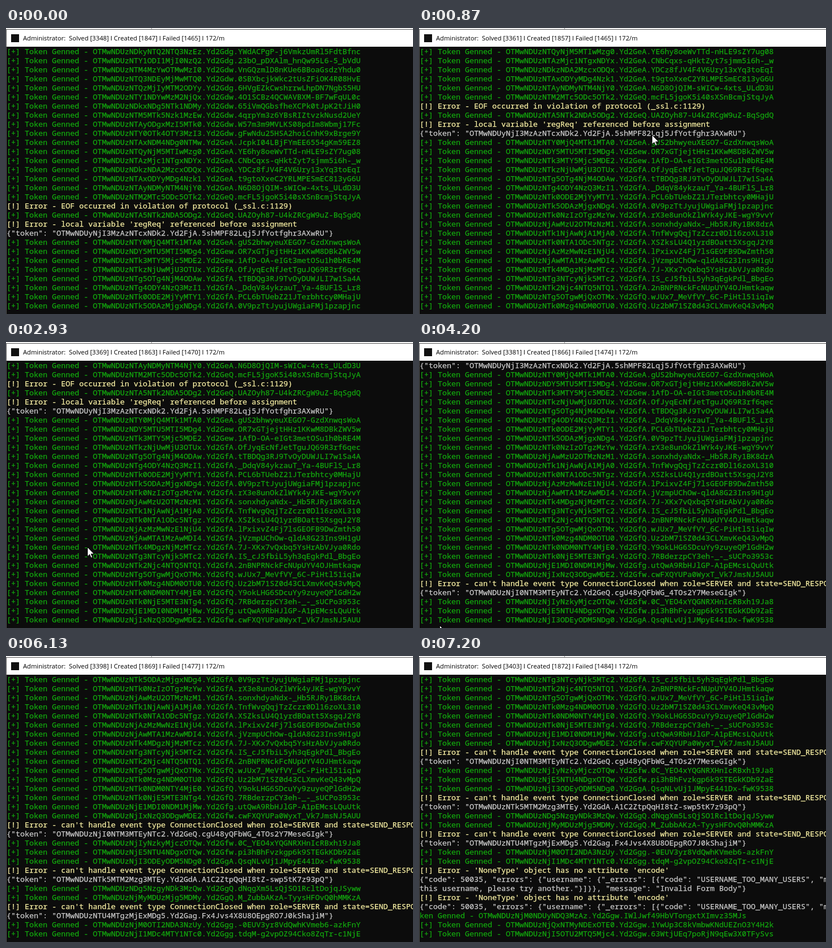
Write an HTML page that moves like this. It is 717 by 504 pixels and loops after 7340 ms.

```html
<!DOCTYPE html>
<html lang="en">
<head>
<meta charset="utf-8">
<title>Console log</title>
<style>
  html, body { margin: 0; width: 100%; height: 100%; overflow: hidden; background: #0c0c0c; }
  #stage { position: relative; width: 717px; height: 504px; overflow: hidden; background: #0c0c0c; }
  #stage > * { position: absolute; }
  #bar { left: 0; top: 0; width: 717px; height: 33px; background: #fff; }
  #edge { left: 0; top: 2px; width: 717px; height: 1px; background: #555; }
  #tick { left: 256px; top: 0; width: 1px; height: 2px; background: #999; }
  #side { left: 0; top: 2px; width: 1px; height: 502px; background: #555; }
  #icon { left: 9px; top: 11px; width: 14px; height: 14px; background: #111; }
  #title {
    left: 30px; top: 10px; white-space: pre; color: #000;
    font: 11.2px/16px "Open Sans", "Noto Sans", sans-serif;
  }
  #view { left: 1px; top: 33px; width: 716px; height: 464px; overflow: hidden; }
  #log {
    white-space: pre; font-variant-ligatures: none; -webkit-text-stroke: .25px;
    font: 13.333px/16px "Noto Sans Mono", "DejaVu Sans Mono", monospace;
  }
  #log div { height: 16px; }
  .ok { color: #13a80e; }
  .err { color: #f9f1a5; }
  .raw { color: #ccc; }
  #mouse { left: 0; top: 0; overflow: visible; }
</style>
</head>
<body>
<div id="stage">
  <div id="bar"></div>
  <div id="edge"></div>
  <div id="tick"></div>
  <div id="side"></div>
  <div id="icon"></div>
  <div id="title"></div>
  <div id="view"><div id="log"></div></div>
  <svg id="mouse" width="14" height="22">
    <path d="M.5 .5V17L4.3 13.4 6.9 19.4 9.4 18.3 6.9 12.5H12.2Z" fill="#fff" stroke="#000"/>
  </svg>
</div>
<script>
// Line kinds: "!" error, '"' token reply, "=" plain reply, "+" plain success, otherwise a token.
const source = String.raw`
NDkyNTQ2NTQ3NzEz.Yd2Gdg.YWdACPgP-j6VmkzUmRl5FdtBfnc
NTY1ODI1MjI0NzQ2.Yd2Gdg.23bO_pDXAlm_hnQw95L6-5_bVdU
NTM4MzYwOTMwMzI0.Yd2Gdw.VnGQzmlD8nKUe6BBoaGsdzYhdu0
NTQ3NDEyMjMwMTQ0.Yd2Gdw.0SBXbcjkWkc2tUsZFiOK4R08HvE
NTQzMjIyMTM2ODYy.Yd2Gdg.6HVgEZkCwshrrwLhpDN7NgbS5HU
NTY1NDYwMzM2NjQx.Yd2Gdw.4O1SCBz4QCWAVBXM-BF7wFqUL0c
NDkxNDg5NTk1NDMy.Yd2Gdw.65iVmQGbsfheXCPk0tJpK2tJiH0
NTM5MTk5Nzk1MzEw.Yd2Gdw.4qrpYm3z6YBsRIZtvzkNusd2UeY
NTAyODgxMzI5MTk0.Yd2Gdw.W57m3m9MVLKS08pdIm8Wbmj17Fc
NTY0OTk4OTY3MzI3.Yd2Gdw.gFwNdu25HSA2hoiCnhK9xBrge9Y
NTAxNDM4NDg0NTMw.Yd2GeA.JcpkI04LBjFYmEE6554gKm59EZ8
NTQyNjM5MTIwMzg0.Yd2GeA.YE6hy8oeWvTTd-nHLE9sZY7ug08
NTAzMjc1NTgxNDYx.Yd2GeA.CNbCqxs-qHktZyt7sjmm5i6h-_w
NDkzNDA2MzcxODQx.Yd2GeA.YDCz8fJV4F4V6Ury13xYq3toEqI
NTAxODYyMDg4Nzk1.Yd2GeA.t9gtoXxeC2YRLMPESmEC813yG6U
NTAyNDMyNTM4NjY0.Yd2GeA.N6D8OjQIM-sWICw-4xts_ULdD3U
NTM2MTc5ODc5OTk2.Yd2GeQ.mcFL5jgoK5i40sXSnBcmjStqJyA
!EOF occurred in violation of protocol (_ssl.c:1129)
NTA5NTk2NDA5ODg2.Yd2GeQ.UAZOyh87-U4kZRCgW9uZ-BqSgdQ
!local variable 'regReq' referenced before assignment
"yNjI3MzAzNTcxNDk2.Yd2FjA.5shMPF82Lqj5JfYotfghr3AXwRU
NTY0MjQ4MTk1MTA0.Yd2GeA.gUS2bhwyeuXEGO7-GzdXnwqsWoA
NDY5MTU5MTI5MDg4.Yd2Gew.OR7xGTjejtHHz1KKwM8DBkZWV5w
NTk3MTY5Mjc5MDE2.Yd2Gew.1AfD-OA-eIGt3metOSu1h0bRE4M
NTkzNjUwMjU3OTUx.Yd2GfA.OfJyqEcNfJetTguJQ69R3rf6qec
NTg5OTg4NjM4ODAw.Yd2GfA.tTBDQg3RJ9TvOyDUWJLI7w1Sa4A
NTg4ODY4NzQ3MzI1.Yd2GfA._DdqV84ykzauT_Ya-4BUFlS_Lr8
NTk0ODE2MjYyMTY1.Yd2GfA.PCL6bTUebZ21JTerbhtcy0MHajU
NTk5ODAzMjgxNDg4.Yd2GfA.0V9pzTtJyujUWgiaFMj1pzapjnc
NTk0NzIzOTgzMzYw.Yd2GfA.rX3e8unOkZlWYk4yJKE-wgY9vvY
NjAwMzU2OTMzNzM1.Yd2GfA.sonxhdyaNdx-_Hb5RJRy1BK8drA
NTk1NjAwNjA1MjA0.Yd2GfA.TnfWvgQqjTzZczr0Dl16zoXL310
NTk0NTA1ODc5NTgz.Yd2GfA.XSZksLU4Q1yrdBOatt5XsgqJ2Y8
NjAzMzMwNzE1NjU4.Yd2GfA.lPxixvZ4Fj7lsGEOFB9DwZmth50
NjAwMTA1MzAwMDI4.Yd2GfA.jVzmpUChOw-qldA8G23Ins9H1gU
NTk4MDgzNjMzMTcz.Yd2GfA.7J-XKx7vQxbq5YsHrAbVJya0Rdo
NTg3NTcyNjk5MTc2.Yd2GfA.IS_cJ5fbiL5yh3qEgkPdl_BbgEo
NTk2Njc4NTQ5NTQ1.Yd2GfA.2nBNPRNckFcNUpUYV4OJHmtkaqw
NTg5OTgwMjQxOTMx.Yd2GfQ.wJUx7_MeVfVY_6C-PiHtl51iqIw
NTk0Mzg4NDM0OTU0.Yd2GfQ.Uz2bM71SZ0d43CLXmvKeQ43vMpQ
NTk0NDM0NTY4MjE0.Yd2GfQ.Y9okLHG6SDcuYy9zuyeQPlGdH2w
NTk0NjE5MTE3NTg4.Yd2GfQ.7RBderzpCY3eh-_-_sUCPo3953c
NjE1MDI0NDM1MjMw.Yd2Gfg.utQwA9RbHJlGP-A1pEMcsLQuUtk
NjIxNzQ3ODgwMDE2.Yd2Gfw.cwFXQYUPa0WyxT_Vk7JmsNJ5AUU
!closed
"zNjI0NTM3MTEyNTc2.Yd2GeQ.cgU48yQFbWG_4TOs2Y7MeseGIgk
NjIyNzkyMjczOTQw.Yd2Gfw.0C_YEO4xYQGNRXHnIcRBxh19Ja8
NjE5NTU4NDgxOTQw.Yd2Gfw.pi3hBhFvzkgp6k9STEGkKDb9ZaE
NjI3ODEyODM5NDg0.Yd2GgA.QsqNLvUj1JMpyE441Dx-fwK9538
!closed
"zNTk5MTM2Mzg3MTEy.Yd2GdA.A1C2ZtpQqHI8tZ-swp5tK7z93pQ
NDg5NzgyNDk3MzQw.Yd2GgQ.dNqgXm5LsQjSO1RcltDojqJSyww
NjMyMDUzMjg5MDMy.Yd2GgQ.M_ZubbAKzA-TyysHFOvQ0hMMKzA
!closed
"zNTU4MTgzMjExMDg5.Yd2Gag.Fx4Jvs4X8U8OEpgRO7J0kShajiM
NjM0OTI2NDA3NzUy.Yd2Ggg.-0EUV3yr8VdQwhKVmeb6-azkFnY
NjI1MDc4MTY1NTc0.Yd2Ggg.tdqM-g2vpOZ94Cko8ZqTr-c1NjE
!'NoneType' object has no attribute 'encode'
=form
=this username, please try another."}]}}, "message": "Invalid Form Body"}
!'NoneType' object has no attribute 'encode'
=form
+ken Genned - OTMwNDUzNjM0NDUyNDQ3MzAz.Yd2Ggw.IWlJwf49HbVTongxtXImvz35MJs
NjQxNTMyNDExOTE0.Yd2Ggw.1YwUp3C8kVmbwKNdUEZnO3Y4H2k
NjI5OTU2MTQ5Mjc4.Yd2Ggw.63WtjUEq7poRjN9qEw3X0TFySvs`;

const longText = {
  closed: "can't handle event type ConnectionClosed when role=SERVER and state=SEND_RESPONSE",
  form: '{"code": 50035, "errors": {"username": {"_errors": [{"code": "USERNAME_TOO_MANY_USERS", "message'
};

function parse(line) {
  const rest = line.slice(1), body = longText[rest] || rest;
  switch (line[0]) {
    case "!": return ["err", "[!] Error - " + body];
    case '"': return ["raw", `{"token": "OTMwNDU${rest}"}`];
    case "=": return ["raw", body];
    case "+": return ["ok", body];
    default: return ["ok", "[+] Token Genned - OTMwNDUz" + line];
  }
}

const $ = id => document.getElementById(id);
const log = $("log"), title = $("title"), mouse = $("mouse");
for (const line of source.trim().split("\n")) {
  const row = document.createElement("div");
  [row.className, row.textContent] = parse(line);
  log.append(row);
}

const LOOP = 7340, STEP = 1000 / 15, ROW = 16;

// Step, rows scrolled, solved, created, failed
const progress = [
  [0, 0, 3348, 1847, 1465],
  [13, 11, 3361, 1857, 1465],
  [44, 15, 3369, 1863, 1470],
  [60, 20, 3381, 1866, 1474],
  [63, 20, 3381, 1866, 1474],
  [82, 24, 3392, 1867, 1476],
  [92, 28, 3398, 1869, 1477],
  [108, 36, 3403, 1872, 1484]
];

// Step, x, y of the pointer tip
const path = [
  [0, 690, 560], [5, 676, 508], [13, 410, 188], [34, 208, 288],
  [44, 143, 361], [60, 36, 491], [63, 36, 499], [68, 36, 530]
];

// Values of a keyed track at a step, linear between keys.
function sample(track, step) {
  const i = track.findIndex(key => key[0] > step);
  if (i < 0) return track.at(-1).slice(1);
  const a = track[i - 1], b = track[i], f = (step - a[0]) / (b[0] - a[0]);
  return a.slice(1).map((v, j) => v + (b[j + 1] - v) * f);
}

function draw(time) {
  // The screen updates 15 times a second, on times rounded to 10 ms.
  const step = Math.floor((time % LOOP + 5) / STEP);
  const [top, solved, created, failed] = sample(progress, step).map(Math.floor);
  const [x, y] = sample(path, step).map(Math.round);
  log.style.transform = `translateY(${-ROW * top}px)`;
  title.textContent =
    `Administrator:  Solved [${solved}] I Created [${created}] I Failed [${failed}] I 172/m`;
  mouse.style.transform = `translate(${x}px, ${y}px)`;
}

const start = performance.now();
function loop() {
  draw(performance.now() - start);
  requestAnimationFrame(loop);
}
loop();
</script>
</body>
</html>
```
